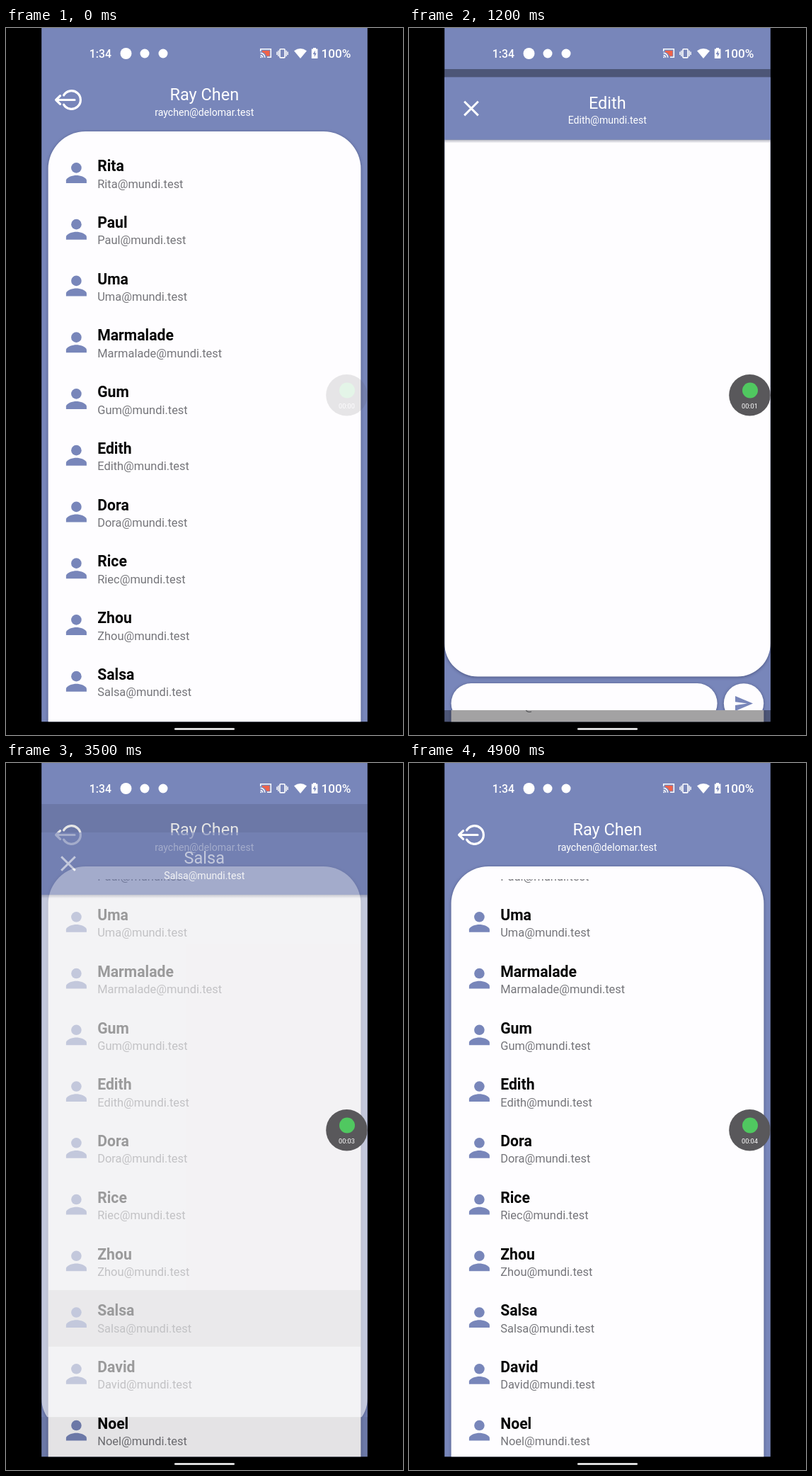
These frames come from a looping animation (561x998 px, 5 s). An HTML page:

```html
<!DOCTYPE html>
<html lang="en">
<head>
<meta charset="utf-8">
<title>Contacts and chat</title>
<style>
  html, body { margin: 0; width: 100%; height: 100%; overflow: hidden; background: #000; }
  svg { display: block; width: 561px; height: 998px; font-family: Roboto, sans-serif; }
  .blue { fill: #7886ba; }
  .sheet { fill: #fefdff; }
  .line { fill: none; stroke: #fff; }
  .name { font-weight: 700; font-size: 21.2px; fill: #060606; }
  .mail { font-size: 16.45px; fill: #75757a; }
  .title { font-size: 23.5px; fill: #fff; text-anchor: middle; }
  .sub { font-size: 14.1px; fill: #fff; text-anchor: middle; }
  .raised { filter: drop-shadow(0 1px 2px rgba(20, 25, 60, .45)); }
</style>
</head>
<body>
<svg viewBox="0 0 561 998">
  <defs>
    <clipPath id="screen"><rect x="50.2" y="0" width="460.6" height="979.2"/></clipPath>
    <clipPath id="rowsClip"><rect x="59.6" y="164" width="441.8" height="816"/></clipPath>
    <clipPath id="chatClip"><rect id="chatBox" x="50" y="58" width="461" height="921.2"/></clipPath>
    <linearGradient id="shade" x2="0" y2="1">
      <stop offset="0" stop-color="#1c2240" stop-opacity=".32"/>
      <stop offset="1" stop-color="#1c2240" stop-opacity="0"/>
    </linearGradient>
    <g id="person">
      <circle cx="99.4" cy="197.4" r="7.3"/>
      <path d="M84.9 218.9v-3.6c0-4.8 9.7-7.3 14.5-7.3s14.5 2.5 14.5 7.3v3.6z"/>
    </g>
  </defs>
  <rect width="561" height="998"/>
  <g clip-path="url(#screen)">
    <rect class="blue" x="50" width="461" height="980"/>

    <g id="home">
      <path class="line" stroke-width="3.2" stroke-linecap="round" stroke-linejoin="round"
        d="M81.6 94.9A12.8 12.8 0 1 1 81.6 108.1M97 101.5H71M76.6 95.6L70.6 101.5L76.6 107.4"/>
      <text class="title" x="280.3" y="102">Ray Chen</text>
      <text class="sub" x="280.3" y="123.5">raychen@delomar.test</text>
      <rect class="sheet raised" x="59.6" y="146" width="441.8" height="900" rx="52.8"/>
      <g clip-path="url(#rowsClip)"><g id="rows">
        <rect id="press" x="59.6" width="441.8" height="79.7" fill="#000"/>
      </g></g>
      <rect id="dim" x="50" y="58" width="461" height="922"/>
    </g>

    <g clip-path="url(#chatClip)"><g id="chat">
      <rect class="blue" x="50" y="58" width="461" height="922"/>
      <path class="sheet raised" d="M50.2 146H510.8V857.1a46.9 46.9 0 0 1-46.9 46.9H97.1a46.9 46.9 0 0 1-46.9-46.9z"/>
      <rect class="blue" x="50" y="58" width="461" height="88"/>
      <rect x="50" y="146" width="461" height="5" fill="url(#shade)"/>
      <circle id="ripple" cx="85" cy="104.5" fill="#4d5890" fill-opacity=".62"/>
      <path class="line" stroke-width="3" d="M78.2 92.2L97.8 111.8M97.8 92.2L78.2 111.8"/>
      <text id="who" class="title" x="280.3" y="102"></text>
      <text id="whoMail" class="sub" x="280.3" y="123.5"></text>
      <rect class="sheet raised" x="59.6" y="913.5" width="376" height="56.3" rx="28.15"/>
      <circle class="sheet raised" cx="473" cy="941.7" r="28.15"/>
      <path class="blue" d="M461 931.5L486 942L461 952.5V944.3L478 942L461 939.7z"/>
    </g></g>

    <g fill="#fff">
      <text x="117.8" y="42" font-size="15.8" font-weight="500">1:34</text>
      <circle cx="169.5" cy="36" r="8"/>
      <circle cx="196" cy="36" r="6.5"/>
      <circle cx="222" cy="36" r="6.5"/>
      <path fill="#f0634a" d="M362 32H372.5V39.5H368A8 8 0 0 0 362 34z"/>
      <path class="line" stroke-width="1.5" d="M359.7 33V29.7H374.3V41.3H369M359.5 35.3A6.4 6.4 0 0 1 365.8 41.8M359.5 38.4A3.3 3.3 0 0 1 362.8 41.8"/>
      <circle cx="360.2" cy="41.2" r="1"/>
      <rect class="line" x="387" y="29.7" width="7" height="12.2" rx="1" stroke-width="1.6"/>
      <path class="line" stroke-width="1.4" d="M384.9 31.7V39.9M382.9 33.5V38M396.1 31.7V39.9M398.1 33.5V38"/>
      <path d="M407 32.2Q416 25.6 425 32.2L416 43z"/>
      <path d="M434 29.5V28H438V29.5H440.4V43H431.8V29.5z"/>
      <path class="blue" d="M437 31.5L433.6 37H435.8V41L438.8 35.5H436.6z"/>
      <text x="445.4" y="42" font-size="17.2" font-weight="500">100%</text>
    </g>

    <g id="bubble">
      <circle cx="481.5" cy="518.3" r="29.3" fill="#59585b"/>
      <circle cx="482" cy="511.5" r="11" fill="#50c860"/>
      <text id="clock" x="481.5" y="537" font-size="9.2" fill="#fff" text-anchor="middle"></text>
    </g>
  </g>
  <rect x="238" y="988.2" width="85" height="2.6" rx="1.3" fill="#fff"/>
</svg>
<script>
const LOOP = 5000, STEP = 100, PITCH = 79.75, ROW_TOP = 166;
const people = ["Rita", "Paul", "Uma", "Marmalade", "Gum", "Edith", "Dora",
  "Rice", "Zhou", "Salsa", "David", "Noel"];
const FIRST = 5, SECOND = 9, INK = .105;
const mail = name => (name === "Rice" ? "Riec" : name) + "@mundi.test";
const el = id => document.getElementById(id);
const set = (id, attrs) => {
  for (const k in attrs) el(id).setAttribute(k, attrs[k]);
};

el("rows").insertAdjacentHTML("beforeend", people.map((name, i) =>
  `<g transform="translate(0 ${i * PITCH})">
    <use href="#person" class="blue"/>
    <text class="name" x="129.2" y="202.2">${name}</text>
    <text class="mail" x="129.2" y="225.6">${mail(name)}</text>
  </g>`).join(""));

// Linear interpolation through [time, value] points, clamped at both ends.
function track(t, ...keys) {
  if (t <= keys[0][0]) return keys[0][1];
  for (let i = 1; i < keys.length; i++) {
    const [t0, a] = keys[i - 1], [t1, b] = keys[i];
    if (t <= t1) return a + (b - a) * (t - t0) / (t1 - t0);
  }
  return keys[keys.length - 1][1];
}

// One visit to a chat screen: opens, gets its cross pressed, closes.
function visit(t, open, tap, close) {
  if (t < open || t >= close + 300) return null;
  if (t < close) {
    return {
      y: track(t, [open, 40], [open + 100, 26], [open + 200, 11.6], [open + 300, 0]),
      alpha: track(t, [open, .6], [open + 100, 1]),
      dim: track(t, [open, .1], [open + 200, .36]),
      ripple: t < tap ? 0 : track(t, [tap, 16], [tap + 100, 22]),
      clip: true
    };
  }
  return {
    y: track(t, [close, 4], [close + 100, 25], [close + 200, 36]),
    alpha: track(t, [close, .9], [close + 100, .25], [close + 200, 0]),
    dim: track(t, [close, .3], [close + 100, .2], [close + 200, .06]),
    ripple: 22,
    clip: false
  };
}

// Row under the finger and the strength of its highlight.
function pressed(t) {
  if (t < 600) return [FIRST, track(t, [100, 0], [300, INK], [400, INK], [600, 0])];
  if (t < 1300) return [FIRST, track(t, [600, 0], [800, INK])];
  if (t >= 3400 && t < 3800) return [SECOND, INK];
  return [FIRST, 0];
}

function draw(time) {
  const t = Math.floor(time / STEP) * STEP;
  const scroll = track(t, [0, 0], [100, 14], [200, 46], [300, 79], [400, 105.4], [500, 126], [600, 139.6]);
  set("rows", { transform: `translate(0 ${-scroll})` });

  const [row, ink] = pressed(t);
  set("press", { y: ROW_TOP + row * PITCH, "fill-opacity": ink });

  const v = visit(t, 1000, 2400, 2600) || visit(t, 3500, 4500, 4600);
  set("dim", { "fill-opacity": v ? v.dim : 0 });
  set("chat", { visibility: v ? "visible" : "hidden" });
  if (v) {
    const name = people[t < 3000 ? FIRST : SECOND];
    el("who").textContent = name;
    el("whoMail").textContent = mail(name);
    set("chat", { transform: `translate(0 ${v.y})`, opacity: v.alpha });
    set("chatBox", { height: 921.2 - (v.clip ? v.y * 1.4 : 0) });
    set("ripple", { r: v.ripple });
  }

  set("bubble", { opacity: track(t, [0, .14], [100, .45], [200, 1]) });
  el("clock").textContent = "00:0" + Math.floor(t / 1000);
}

const start = performance.now();
function tick() {
  draw((performance.now() - start) % LOOP);
  requestAnimationFrame(tick);
}
tick();
</script>
</body>
</html>
```
